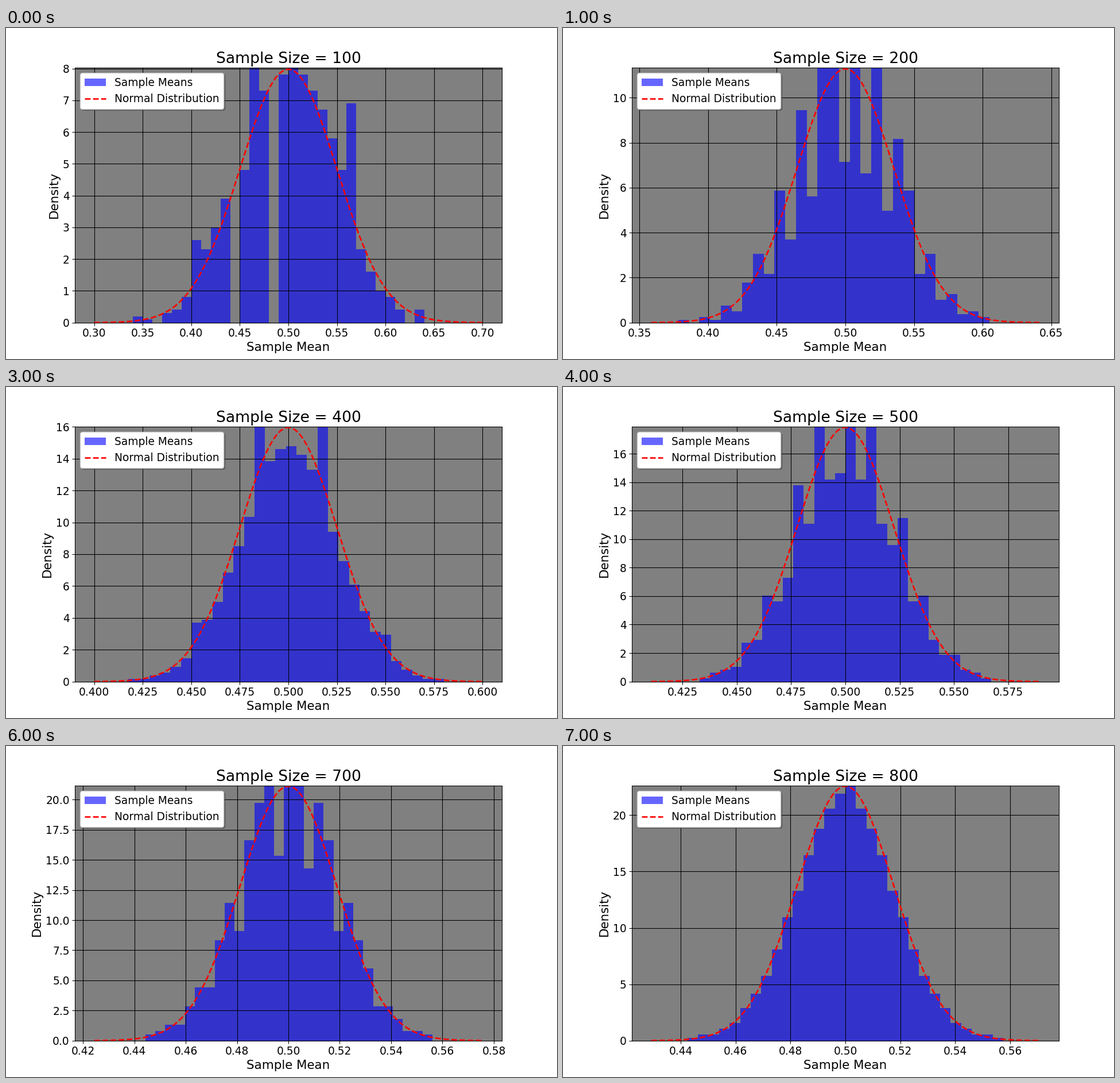
These frames come from a looping animation (960x576 px, 8000 ms). A matplotlib script:

```python
from math import comb

import numpy as np
import matplotlib.pyplot as plt
from matplotlib.animation import FuncAnimation

DRAWS = 1000
# Fewest and most heads seen for each number of coin tosses
HEADS = {100: (34, 64), 200: (74, 121), 300: (122, 178), 400: (167, 232),
         500: (214, 286), 600: (267, 348), 700: (311, 392), 800: (354, 446)}
SIZES = list(HEADS)

plt.rcParams["font.family"] = "DejaVu Sans"
fig, ax = plt.subplots(figsize=(10, 6), dpi=96)


def sample_means(size):
    """Evenly spread quantiles of the mean of fair coin tosses."""
    chances = [comb(size, k) / 2**size for k in range(size + 1)]
    levels = (np.arange(DRAWS) + 0.5) / DRAWS
    return np.searchsorted(np.cumsum(chances), levels) / size


def draw(i):
    size = SIZES[i]
    low, high = HEADS[size]
    sigma = 0.5 / np.sqrt(size)
    peak = 1 / (sigma * np.sqrt(2 * np.pi))
    z = np.linspace(-4, 4, 1000)

    ax.clear()
    ax.set_facecolor("gray")
    ax.hist(sample_means(size), bins=30, range=(low / size, high / size),
            density=True, color="b", alpha=0.6, label="Sample Means")
    ax.plot(0.5 + sigma * z, peak * np.exp(-z**2 / 2), "r--", lw=2,
            label="Normal Distribution")
    ax.set_xlim(0.5 - 4.4 * sigma, 0.5 + 4.4 * sigma)
    ax.set_ylim(0, peak + 0.05)
    ax.set_title(f"Sample Size = {size}", fontsize=20)
    ax.set_xlabel("Sample Mean", fontsize=16)
    ax.set_ylabel("Density", fontsize=16)
    ax.tick_params(labelsize=14)
    ax.grid(True, color="black")
    ax.legend(loc="upper left", fontsize=14, shadow=True)


anim = FuncAnimation(fig, draw, frames=len(SIZES), interval=1000, repeat=True)
plt.show()
```
